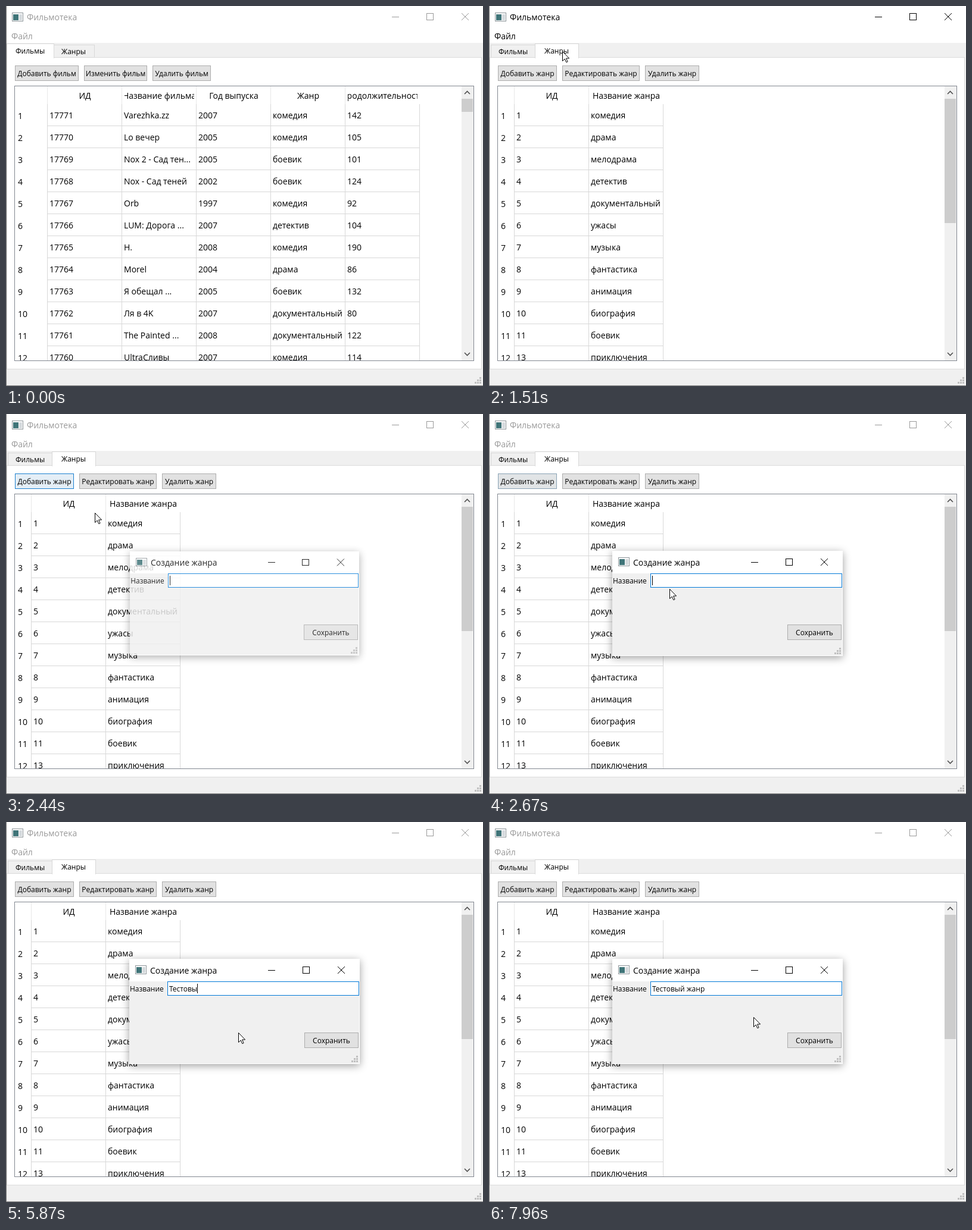
Animation, 801 px wide and 639 px high, one loop 8000 ms. Source, as an HTML page:

```html
<!DOCTYPE html>
<html lang="ru">
<head>
<meta charset="utf-8">
<title>Фильмотека</title>
<style>
html, body { margin: 0; width: 100%; height: 100%; overflow: hidden; background: #fff; }
svg { display: block; width: 801px; height: 639px; }
text { font: 14px "Open Sans", "Noto Sans", sans-serif; white-space: pre; }
.small { font-size: 12px; }
rect, .line { shape-rendering: crispEdges; }
#dialogBack { filter: drop-shadow(0 3px 7px rgba(0, 0, 0, .38)); }
</style>
</head>
<body>
<svg id="stage" viewBox="0 0 801 639"></svg>
<script>
const LOOP = 8000;
const TAB_CLICK = 1430, DIALOG_OPEN = 2330, CARET_START = 2290, BLINK = 545;

// ---- markup helpers ----
const fillRect = (x, y, w, h, fill, extra = '') =>
  `<rect x="${x}" y="${y}" width="${w}" height="${h}" fill="${fill}" ${extra}/>`;
const box = (x, y, w, h, fill, stroke, extra = '') =>
  `<rect x="${x + .5}" y="${y + .5}" width="${w - 1}" height="${h - 1}" fill="${fill}" stroke="${stroke}" ${extra}/>`;
const label = (x, y, str, extra = '') => `<text x="${x}" y="${y}" ${extra}>${str}</text>`;
const small = (x, y, str, extra = '') => label(x, y, str, `class="small" ${extra}`);
const centered = 'text-anchor="middle"';
const range = n => [...Array(n).keys()];

const button = (x, y, w, h, str, id) =>
  box(x, y, w, h, '#e1e1e1', '#adadad') +
  (id ? box(x, y, w, h, '#e5f1fb', '#0078d7', `id="${id}" opacity="0"`) : '') +
  small(x + w / 2, y + 18, str, centered);

const appIcon = (x, y) =>
  box(x, y, 19, 15, '#fff', '#8d9599') +
  fillRect(x + 2, y + 3, 9, 10, '#3f7478') +
  fillRect(x + 12, y + 3, 5, 10, '#d5dadd');

const windowControls = (x, y, gap) => `<g fill="none" stroke="currentColor">
  <path class="line" d="M${x} ${y + 6}.5h12"/>
  <rect x="${x + gap + .5}" y="${y + .5}" width="11" height="11"/>
  <path d="M${x + 2 * gap + 1} ${y}l12 12m0-12l-12 12"/></g>`;

const sizeGrip = (x, y) => range(3).flatMap(row => range(row + 1).map(col =>
  fillRect(x - 4 * col, y + 4 * row, 3, 3, '#bfbfbf'))).join('');

const scrollBar = thumb =>
  fillRect(765, 135, 20, 461, '#f0f0f0') + fillRect(765, 156, 19, thumb, '#cdcdcd') +
  `<path d="M770 148l4.500-4.500 4.500 4.500M770 583l4.500 4.500 4.500-4.500" fill="none" stroke="#505050" stroke-width="1.600"/>`;

function table(left, headers, rows, thumb) {
  const colX = i => left + 125 * i, rowY = i => 201 + 37 * i, right = colX(headers.length);
  let out = box(14, 134, 772, 463, '#fff', '#828790') + '<g clip-path="url(#tableClip)">';
  for (let i = 0; i <= headers.length; i++) {
    if (i < headers.length) out += fillRect(colX(i), 135, 1, 30, '#e8e8e8');
    out += fillRect(colX(i), 165, 1, 431, '#d8d8d8');
  }
  headers.forEach((str, i) => {
    out += `<svg x="${colX(i) + 5}" y="135" width="117" height="30" overflow="hidden">${label(58.5, 21, str, centered)}</svg>`;
  });
  rows.forEach((cells, r) => {
    out += fillRect(left, rowY(r), right - left, 1, '#d8d8d8') + label(20, rowY(r) - 11, r + 1);
    cells.forEach((str, c) => out += label(colX(c) + 4, rowY(r) - 12, str));
  });
  return out + '</g>' + scrollBar(thumb);
}

// ---- contents ----
const films = [
  ['Varezhka.zz', 2007, 'комедия', 142],
  ['Lo вечер', 2005, 'комедия', 105],
  ['Nox 2 - Сад тен...', 2005, 'боевик', 101],
  ['Nox - Сад теней', 2002, 'боевик', 124],
  ['Orb', 1997, 'комедия', 92],
  ['LUM: Дорога ...', 2007, 'детектив', 104],
  ['H.', 2008, 'комедия', 190],
  ['Morel', 2004, 'драма', 86],
  ['Я обещал ...', 2005, 'боевик', 132],
  ['Ля в 4K', 2007, 'документальный', 80],
  ['The Painted ...', 2008, 'документальный', 122],
  ['UltraСливы', 2007, 'комедия', 114]
].map((film, i) => [17771 - i, ...film]);

const genres = ['комедия', 'драма', 'мелодрама', 'детектив', 'документальный', 'ужасы', 'музыка',
  'фантастика', 'анимация', 'биография', 'боевик', 'приключения']
  .map((name, i) => [i < 11 ? i + 1 : 13, name]);

const filmsPage = `<g id="filmsPage">
  ${box(80, 65, 69, 22, '#f0f0f0', '#d9d9d9')}
  ${box(80, 65, 69, 22, '#d8eaf9', '#d0dbe4', 'id="tabHover"')}
  ${box(1, 63, 80, 25, '#fff', '#d9d9d9')}${fillRect(2, 86, 78, 3, '#fff')}
  ${small(16, 80, 'Фильмы')}${small(93, 81, 'Жанры')}
  ${button(15, 100, 107, 26, 'Добавить фильм')}
  ${button(131, 100, 106, 26, 'Изменить фильм')}
  ${button(246, 100, 98, 26, 'Удалить фильм')}
  ${table(69, ['ИД', 'Название фильма', 'Год выпуска', 'Жанр', 'Продолжительность'], films, 22)}
</g>`;

const genresPage = `<g id="genresPage">
  ${box(3, 65, 75, 22, '#f0f0f0', '#d9d9d9')}
  ${box(77, 63, 74, 25, '#fff', '#d9d9d9')}${fillRect(78, 86, 72, 3, '#fff')}
  ${small(16, 81, 'Фильмы')}${small(93, 80, 'Жанры')}
  ${button(15, 100, 99, 26, 'Добавить жанр', 'addHover')}
  ${button(123, 100, 130, 26, 'Редактировать жанр', 'editHover')}
  ${button(262, 100, 91, 26, 'Удалить жанр')}
  ${table(42, ['ИД', 'Название жанра'], genres, 209)}
</g>`;

const dialogMarkup = `<g id="dialog">
  ${fillRect(207, 230, 387, 177, '#fff', 'id="dialogBack"')}
  ${fillRect(207, 268, 386, 138, '#f0f0f0')}
  ${appIcon(217, 241)}${label(242, 255, 'Создание жанра')}
  ${windowControls(440, 243, 58)}
  ${small(208, 285, 'Название')}
  ${box(271, 268, 322, 24, '#fff', '#0078d7')}
  ${small(274, 285, '', 'id="typed"')}
  ${fillRect(274, 272, 1, 16, '#000', 'id="caret"')}
  ${button(501, 354, 91, 26, 'Сохранить')}
  ${sizeGrip(588, 393)}
</g>`;

document.getElementById('stage').innerHTML = `
  <clipPath id="tableClip"><rect x="15" y="135" width="770" height="461"/></clipPath>
  ${fillRect(0, 0, 801, 639, '#fff')}
  ${fillRect(0, 62, 801, 577, '#f0f0f0')}
  ${appIcon(10, 11)}
  <g id="chrome">${label(35, 24, 'Фильмотека', 'fill="currentColor"')}${label(9, 56, 'Файл', 'fill="currentColor"')}
  ${windowControls(648, 12, 58)}</g>
  ${box(1, 86, 798, 525, '#fff', '#dcdcdc')}
  ${filmsPage}${genresPage}
  ${sizeGrip(795, 624)}
  ${fillRect(0, 0, 1, 639, '#777')}${fillRect(0, 638, 801, 1, '#777')}
  ${dialogMarkup}
  <path id="cursor" d="M.5.5v16l3.700-3.500 2.600 5.700 2.300-1-2.500-5.700h5z" fill="#fff" stroke="#000"/>`;

// ---- motion ----
const el = Object.fromEntries(
  [...document.querySelectorAll('[id]')].map(node => [node.id, node]));

const cursorPath = [
  [430, 545, 628], [590, 430, 460], [760, 270, 240], [920, 165, 112], [1010, 135, 86], [1170, 118, 73],
  [1340, 123, 76], [1510, 123, 76], [1700, 142, 100], [1850, 148, 115], [1970, 118, 115], [2060, 88, 112],
  [2290, 92, 115], [2440, 148, 165], [2600, 260, 262], [2760, 350, 330], [2910, 390, 354],
  [7880, 390, 354], [7960, 444, 328]
];
const addGlow = [[1950, 0], [2060, .55], [2150, 1], [2440, .85], [2750, 0]];
const editGlow = [[1680, 0], [1800, 1], [1950, 1], [2060, .45], [2210, 0]];

// The first attempt is typed with the wrong keyboard layout, then erased.
const typing = [
  [CARET_START, ''], [3840, 'N'], [4010, 'Nt'], [4390, 'N'], [4620, ''],
  ...[5000, 5170, 5410, 5490, 5560, 5710, 5870, 5940, 6110, 6650, 6730, 6960, 7110]
    .map((time, i) => [time, 'Тестовый жанр'.slice(0, i + 1)])
];

// The screen refreshes in evenly spaced steps while the pointer moves.
const bursts = [[430, 1170, 10], [1270, 2060, 11], [2130, 2910, 11], [7900, 7960, 2]];

function refreshTime(t) {
  let shown = 0;
  for (const [from, to, steps] of bursts) {
    if (t < from) break;
    const step = (to - from) / (steps - 1);
    shown = Math.min(to, from + Math.floor((t - from + 12) / step) * step);
  }
  return shown;
}

function tween(keys, t) {
  const next = keys.findIndex(key => key[0] > t);
  if (next === 0) return keys[0].slice(1);
  if (next < 0) return keys.at(-1).slice(1);
  const a = keys[next - 1], b = keys[next], p = (t - a[0]) / (b[0] - a[0]);
  return a.slice(1).map((v, i) => v + (b[i + 1] - v) * p);
}

const show = (node, on) => node.setAttribute('display', on ? 'inline' : 'none');

function draw(t) {
  const shown = refreshTime(t);
  const switched = shown >= TAB_CLICK, opened = shown >= DIALOG_OPEN;
  el.chrome.setAttribute('color', switched && !opened ? '#000' : '#999');
  show(el.filmsPage, !switched);
  show(el.genresPage, switched);
  show(el.tabHover, shown >= 1000);
  el.addHover.setAttribute('opacity', tween(addGlow, shown));
  el.editHover.setAttribute('opacity', tween(editGlow, shown));

  show(el.cursor, shown >= 430);
  el.cursor.setAttribute('transform', `translate(${tween(cursorPath, shown).map(Math.round)})`);

  show(el.dialog, opened);
  if (!opened) return;
  const p = Math.min(1, (shown - DIALOG_OPEN) / 190), eased = 1 - (1 - p) ** 2;
  el.dialog.setAttribute('opacity', eased);
  el.dialog.setAttribute('transform',
    `translate(400.5 318.5) scale(${.96 + .04 * eased}) translate(-400.5 -318.5)`);

  const [keyTime, str] = typing.findLast(key => key[0] <= t);
  el.typed.textContent = str;
  el.caret.setAttribute('x', 274 + Math.round(str ? el.typed.getComputedTextLength() - .5 : 0));
  show(el.caret, Math.floor((t - keyTime) / BLINK) % 2 === 0);
}

const start = performance.now();
function tick() {
  draw((performance.now() - start) % LOOP);
  requestAnimationFrame(tick);
}
tick();
</script>
</body>
</html>
```
